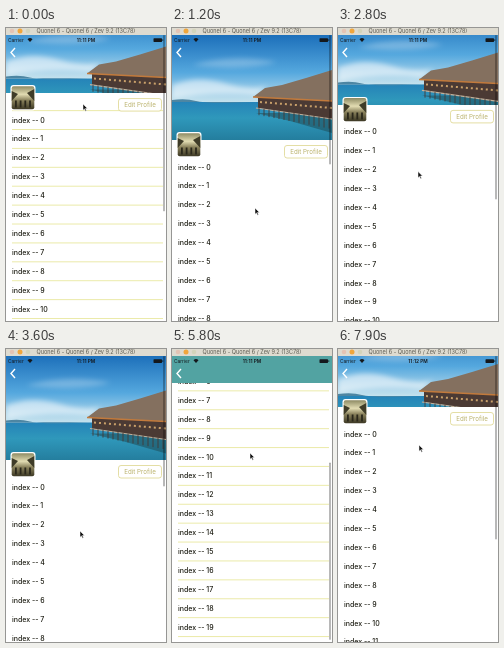
These frames come from a looping animation (160 px wide and 293 px high, 8 s). An HTML page:

```html
<!DOCTYPE html>
<html lang="en">
<head>
<meta charset="utf-8">
<title>Stretchy profile header</title>
<style>
  html, body { margin: 0; width: 100%; height: 100%; overflow: hidden; background: #fff; }
  #stage { display: block; width: 100vw; height: 100vh; }
  text { font-family: Inter, Roboto, sans-serif; }
</style>
</head>
<body>
<svg id="stage" viewBox="0 0 160 293">
  <defs>
    <linearGradient id="sky" x2="0" y2="1">
      <stop offset="0" stop-color="#1c6fba"/>
      <stop offset=".55" stop-color="#55a8de"/>
      <stop offset="1" stop-color="#c9e4ee"/>
    </linearGradient>
    <linearGradient id="sea" x2="0" y2="1">
      <stop offset="0" stop-color="#2583b8"/>
      <stop offset=".4" stop-color="#2f98bb"/>
      <stop offset="1" stop-color="#237b9b"/>
    </linearGradient>
    <linearGradient id="sepia" x2="0" y2="1">
      <stop offset="0" stop-color="#8d8a63"/>
      <stop offset=".35" stop-color="#e2dcb2"/>
      <stop offset=".6" stop-color="#8a825c"/>
      <stop offset="1" stop-color="#3c3824"/>
    </linearGradient>
    <filter id="soft" x="-20%" y="-50%" width="140%" height="200%"><feGaussianBlur stdDeviation="2.5"/></filter>
  </defs>

  <rect width="160" height="293" fill="#fff"/>

  <g id="list">
    <g id="lines" stroke="#e3e184" stroke-width=".7"></g>
    <g id="rows" font-size="7" font-weight="500" fill="#1c1c12"></g>
    <rect x="112.5" y="63.5" width="43" height="12.5" rx="2.5" fill="#fff" stroke="#ddd68f" stroke-width=".8"/>
    <text x="134" y="72" font-size="6.2" text-anchor="middle" fill="#b9b16a">Edit Profile</text>
  </g>

  <svg id="head" y="7" width="160" height="51">
    <g id="photo">
      <rect width="160" height="68" fill="url(#sky)"/>
      <g fill="#fff" filter="url(#soft)">
        <path d="M0 50Q25 40 52 48T95 51L85 60Q40 56 0 64Z" opacity=".55"/>
        <path d="M20 30Q60 18 105 27Q75 36 20 30Z" opacity=".25"/>
      </g>
      <rect y="67" width="160" height="40" fill="url(#sea)"/>
      <path d="M0 67V65Q14 63 24 66T82 67Z" fill="#4d86a3"/>
      <path d="M84 78H160V98L118 86Z" fill="#1e5260" opacity=".6"/>
      <path d="M86 61L160 64V84L86 73Z" fill="#4b3a34"/>
      <path d="M88 67L160 73" stroke="#c9a06a" stroke-width="2" stroke-dasharray="2 3"/>
      <path d="M84 73L160 84" stroke="#c3b09a" stroke-width="1.2"/>
      <path id="stilts" stroke="#453c38" stroke-width=".9"/>
      <path d="M81 62L93 53L110 50L134 43L160 35V66L120 64Z" fill="#84705f"/>
      <path d="M81 62L120 64L160 66" fill="none" stroke="#c27a3c" stroke-width="1.5"/>
    </g>
    <rect id="tint" width="160" height="110" fill="#52a3a2"/>
  </svg>

  <g id="avatar">
    <rect x="4.5" y="50" width="25" height="25.5" rx="3" fill="#fff"/>
    <rect x="5.7" y="51.2" width="22.6" height="23.1" rx="2" fill="url(#sepia)"/>
    <path d="M5.7 56L12 59L5.7 66ZM28.3 54L21 58L28.3 66Z" fill="#3f3c28"/>
    <path d="M9 69H25" stroke="#2b281b" stroke-width="7" stroke-dasharray="1.8 2.9"/>
  </g>

  <g id="chrome">
    <rect id="bar" x="157.3" width="1.4" rx=".7" fill="#000" opacity=".4"/>
    <path d="M9 20L5 24.5L9 29" fill="none" stroke="#fff" stroke-width="1.4"/>
    <g font-size="4.8" fill="#14181c">
      <text x="2" y="13.7">Carrier</text>
      <text id="clock" x="80" y="13.7" text-anchor="middle" font-weight="600"></text>
    </g>
    <path d="M21.5 11.2Q24 9 26.5 11.2L24 14Z" fill="#14181c"/>
    <rect x="147.5" y="10.3" width="8.5" height="3.6" rx=".6" fill="#14181c"/>
    <rect x="156.4" y="11.3" width=".8" height="1.6" fill="#14181c"/>
    <rect width="160" height="7" fill="#dedbd0"/>
    <circle cx="6" cy="3" r="2.3" fill="#e3c3b4"/>
    <circle cx="14" cy="3" r="2.5" fill="#f0a63c"/>
    <circle cx="22" cy="3" r="2.3" fill="#d3d4bb"/>
    <text x="80" y="5.2" font-size="5.5" text-anchor="middle" fill="#5c5a50">Quonel 6 - Quonel 6 / Zev 9.2 (13C78)</text>
  </g>

  <path id="cursor" d="M0 0V6.2L1.5 4.9L2.5 7.2L3.5 6.8L2.5 4.5H4.5Z" fill="#111" stroke="#fff" stroke-width=".5"/>
</svg>
<script>
const LOOP = 8000, STEP = 100, ROW = 18.9, COUNT = 20;
const TOP = 7, REST = 58, NAV = 34, VIEW = 286, CONTENT = 446;
const $ = id => document.getElementById(id);
const set = (id, attrs) => {
  for (const key in attrs) $(id).setAttribute(key, attrs[key]);
};
const clamp = v => Math.min(1, Math.max(0, v));
const ease = u => (1 - Math.cos(Math.PI * clamp(u))) / 2;
// Rises from 0 to 1 at the peak and falls back to 0.
const swing = (t, from, peak, to) =>
  t < peak ? ease((t - from) / (peak - from)) : ease((to - t) / (to - peak));

// Pointer stops: time, x, y
const stops = [[0, 77, 76], [1200, 83, 180], [2000, 86, 105], [3600, 74, 182],
  [4400, 77, 219], [5800, 78, 104], [LOOP, 81, 96]];

function pointer(t) {
  const i = stops.findIndex(stop => stop[0] > t);
  const [t0, x0, y0] = stops[i - 1], [t1, x1, y1] = stops[i];
  const e = ease((t - t0) / (t1 - t0));
  return `${x0 + (x1 - x0) * e} ${y0 + (y1 - y0) * e}`;
}

let rows = "", lines = "", stilts = "";
for (let i = 0; i <= COUNT; i++) {
  const y = 85 + i * ROW;
  if (i < COUNT) rows += `<text x="6" y="${y + 2.5}">index -- ${i}</text>`;
  lines += `<path d="M6 ${y - ROW / 2}H157"/>`;
}
for (let x = 87; x < 160; x += 5) stilts += `M${x} ${73 + (x - 86) * .14}v${7 + (x - 86) * .05}`;
$("rows").innerHTML = rows;
$("lines").innerHTML = lines;
set("stilts", { d: stilts });

function draw(t) {
  // Two rubber-band pulls, then one scroll to the end of the list and back.
  const stretch = 54 * swing(t, -370, 1200, 2150) + 53 * swing(t, 2250, 3600, 4400);
  const scroll = 166 * swing(t, 4700, 5800, 7200);
  const pull = stretch - scroll;
  const collapse = clamp(scroll / (REST - NAV));
  const height = Math.max(NAV, REST + pull) - TOP;

  set("list", { transform: `translate(0 ${pull})` });
  set("lines", { opacity: Math.max(clamp(1 - t / 1000), collapse) });
  set("head", { height });
  set("photo", { transform: `translate(0 ${(height - 105) / 2})` });
  set("tint", { opacity: clamp((scroll - 20) / 50) });

  // The avatar shrinks towards its lower edge, then slides below the header.
  const size = 1 - .3 * collapse;
  set("avatar", { transform: `translate(0 ${pull}) translate(4.5 75.5) scale(${size}) translate(-4.5 -75.5)` });
  $("stage").insertBefore($("avatar"), collapse < 1 ? $("chrome") : $("head"));

  const ratio = VIEW / CONTENT;
  const over = Math.max(stretch, scroll - (CONTENT - VIEW), 0);
  set("bar", { y: TOP + scroll * ratio, height: VIEW * ratio - over });
  set("cursor", { transform: `translate(${pointer(t)})` });
  $("clock").textContent = t < 6800 ? "11:11 PM" : "11:12 PM";
}

function tick() {
  draw(Math.floor(performance.now() % LOOP / STEP) * STEP);
  requestAnimationFrame(tick);
}
tick();
</script>
</body>
</html>
```
